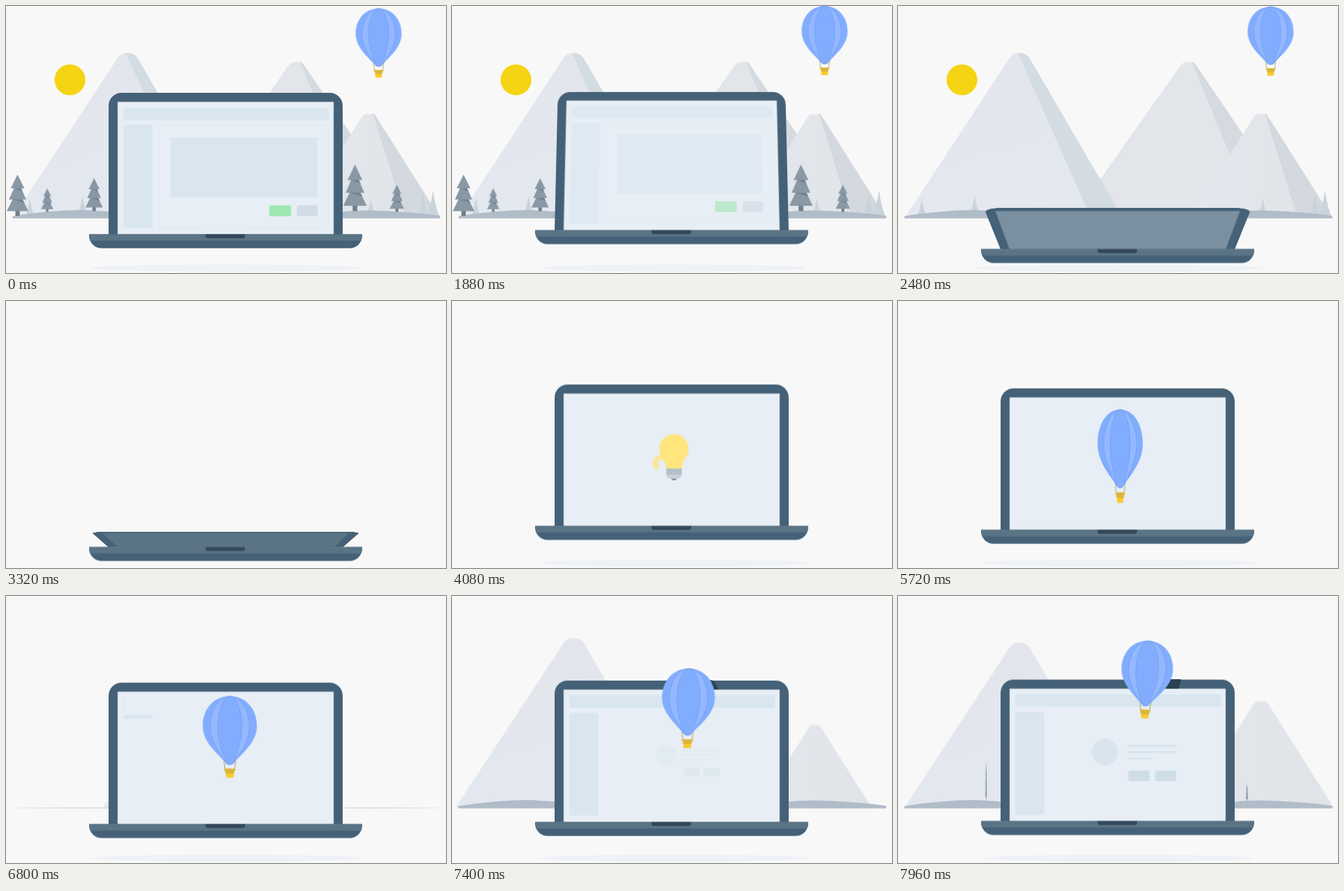
These frames come from a looping animation (609x369 px, 8000 ms). An HTML page without scripts:

```html
<!DOCTYPE html>
<html lang="en">
<head>
<meta charset="utf-8">
<title>Laptop and balloon</title>
<style>
html, body { margin: 0; width: 100%; height: 100%; overflow: hidden; background: #f8f8f8; }
.stage { position: relative; width: 609px; height: 369px; overflow: hidden; }
svg { position: absolute; left: 0; top: 0; display: block; overflow: visible; }
.anim, .stage [class] { animation-duration: 8s; animation-iteration-count: infinite; animation-timing-function: ease-in-out; }

/* scenery */
.sun { animation-name: sun; transform-origin: 88.5px 102px; }
.hill { animation-name: hill; }
.left { transform-origin: 160px 293px; }
.right { transform-origin: 502px 293px; animation-name: hill-late; }
.mid { transform-origin: 403px 293px; animation-name: hill-once; }
.face { animation-name: face; }
.ground { animation-name: ground; transform-origin: 0 293.5px; }
.pines { animation-name: pines; transform-origin: 0 290px; }
.tree { animation-name: tree; }
.shade { animation-name: shade; transform-origin: 306px 362px; }
@keyframes sun { 0%, 32% { transform: scale(1) } 37%, 100% { transform: scale(0) } }
@keyframes hill {
  0%, 32% { transform: scale(1) }
  38%, 84.2% { transform: scale(0); animation-timing-function: linear }
  85% { transform: scale(.17); animation-timing-function: ease-out }
  92.5% { transform: scale(1.03) }
  96.5% { transform: scale(.992) }
  100% { transform: scale(1.004) }
}
@keyframes hill-late {
  0%, 32% { transform: scale(1) }
  38%, 86% { transform: scale(0); animation-timing-function: ease-out }
  97% { transform: scale(1.03) }
  100% { transform: scale(1.026) }
}
@keyframes hill-once { 0%, 32% { transform: scale(1) } 37%, 100% { transform: scale(0) } }
@keyframes face { 0%, 38% { opacity: 1 } 38.1%, 100% { opacity: 0 } }
@keyframes ground {
  0%, 35% { transform: scaleY(1) }
  40%, 84.2% { transform: scaleY(0) }
  85% { transform: scaleY(.08) }
  91%, 100% { transform: scaleY(1) }
}
@keyframes pines { 0%, 32% { transform: scaleY(1) } 36%, 100% { transform: scaleY(0) } }
@keyframes tree {
  0%, 24.5% { transform: scale(1) }
  30.5%, 98.4% { transform: scale(0, .3) }
  99.4%, 100% { transform: var(--grown, scale(0, .3)) }
}
@keyframes shade {
  0% { transform: none; opacity: 1 }
  15%, 23.5% { transform: scaleX(.979); opacity: 1 }
  31% { transform: scaleX(1.05); opacity: 1 }
  36%, 43% { transform: scaleX(1.05); opacity: 0 }
  50.6% { transform: scaleX(.981); opacity: 1 }
  77% { transform: scaleX(1.004); opacity: 1 }
  100% { transform: scaleX(.981); opacity: 1 }
}

/* laptop */
.laptop { position: absolute; left: 0; top: 0; width: 609px; height: 369px; animation-name: hover; }
.hinge { position: absolute; left: 141.5px; top: 119.5px; width: 324px; height: 196px; perspective: 1450px; perspective-origin: 50% 2%; }
.lid { position: absolute; inset: 0; transform-origin: 50% 100%; animation-name: lid; }
.screen { animation-name: screen; }
.editor { animation-name: editor; }
.bar { animation-name: bar; transform-origin: 162px 140px; }
.side { animation-name: side; transform-origin: 162px 164px; }
.card { animation-name: card; transform-origin: 326px 230px; }
.cast { animation-name: cast; }
@keyframes hover {
  0% { transform: none; animation-timing-function: cubic-bezier(.3, .45, .6, 1) }
  15.6% { transform: translateY(-15.5px); animation-timing-function: cubic-bezier(.35, 0, .68, .15) }
  23.5% { transform: translateY(-5.7px); animation-timing-function: cubic-bezier(.35, .45, .65, .9) }
  31.5% { transform: translateY(21px); animation-timing-function: ease-out }
  36% { transform: translateY(25.3px) }
  41.5% { transform: translateY(24.5px); animation-timing-function: cubic-bezier(.4, .05, .4, 1) }
  50.6% { transform: translateY(-4.6px); animation-timing-function: cubic-bezier(.37, 0, .63, 1) }
  76.9% { transform: translateY(1.3px); animation-timing-function: cubic-bezier(.37, 0, .63, 1) }
  100% { transform: translateY(-4.5px) }
}
@keyframes lid {
  0%, 17% { transform: rotateX(0) }
  23.5% { transform: rotateX(12.35deg) }
  34%, 39% { transform: rotateX(-84deg) }
  41.5% { transform: rotateX(-77deg) }
  48% { transform: rotateX(3deg) }
  50.5%, 100% { transform: rotateX(0) }
}
@keyframes screen {
  0%, 27% { fill: #e7eef5 }
  33%, 42% { fill: #5a7385 }
  46%, 100% { fill: #e7eef5 }
}
@keyframes editor { 0%, 20% { opacity: 1 } 28%, 100% { opacity: 0 } }
@keyframes bar {
  0%, 20% { opacity: 1; transform: none }
  28% { opacity: 0; transform: none }
  28.1%, 84.7% { opacity: 0; transform: scaleX(0) }
  84.8% { opacity: 1; transform: scaleX(.003); animation-timing-function: ease-in-out }
  92%, 100% { opacity: 1; transform: none }
}
@keyframes side {
  0%, 20% { opacity: 1; transform: none }
  28% { opacity: 0; transform: none }
  28.1%, 84% { opacity: 0; transform: scaleY(0) }
  84.1% { opacity: 1; transform: scaleY(0) }
  85% { opacity: 1; transform: scaleY(.04) }
  92%, 100% { opacity: 1; transform: none }
}
@keyframes card {
  0%, 90% { opacity: 0; transform: scale(.6) }
  96%, 100% { opacity: 1; transform: none }
}
@keyframes cast {
  0%, 85% { opacity: 0; transform: translate(-37px, 90px) }
  85.1% { opacity: 1; transform: translate(-37px, 90px) }
  99.5%, 100% { opacity: 1; transform: none }
}

/* bulb that becomes the balloon */
.flyer { animation-name: fly; }
.skin { animation-name: skin; }
.gear { animation-name: gear; }
.cap { animation-name: cap; }
.tail { animation-name: tail; }
@keyframes fly {
  0% { transform: translate(515.7px, 3.5px) }
  26% { transform: translate(515.7px, 0) }
  32% { transform: translate(515.7px, 1px) }
  37% { transform: translate(515.7px, 45px) scale(0) }
  37.1%, 45.5% { transform: translate(307.3px, 216px) scale(0) }
  49% { transform: translate(307.3px, 182px) scale(1.06) }
  51% { transform: translate(307.3px, 184px) }
  61% { transform: translate(307.3px, 187px) }
  64% { transform: translate(307.3px, 194px) scale(1.05, .85) }
  71.5% { transform: translate(307.5px, 150px) scale(.985, 1.35) }
  76% { transform: translate(308px, 138px) scale(1.25, 1.12) }
  80% { transform: translate(309px, 140px) scale(1.16, 1.19) }
  85% { transform: translate(309.8px, 138.5px) scale(1.18); animation-timing-function: cubic-bezier(.4, .1, .65, .9) }
  99.5% { transform: translate(347px, 62px) rotate(3deg) scale(1.123) }
  100% { transform: translate(348px, 60px) rotate(3deg) scale(1.12) }
}
@keyframes skin {
  0%, 37% { fill: #82adff; d: path("M0,0C19,0 31.8,15 31.8,35C31.8,55 12,69 5,78Q0,83 -5,78C-12,69 -31.8,55 -31.8,35C-31.8,15 -19,0 0,0Z") }
  37.1%, 61% { fill: #ffe57c; d: path("M0,0C11,0 20.2,9 20.2,20.5C20.2,32 11.5,34 10.5,48Q0,48 -10.5,48C-11.5,34 -20.2,32 -20.2,20.5C-20.2,9 -11,0 0,0Z") }
  67%, 100% { fill: #82adff; d: path("M0,0C19,0 31.8,15 31.8,35C31.8,55 12,69 5,78Q0,83 -5,78C-12,69 -31.8,55 -31.8,35C-31.8,15 -19,0 0,0Z") }
}
@keyframes gear { 0%, 37% { opacity: 1 } 37.1%, 64% { opacity: 0 } 68%, 100% { opacity: 1 } }
@keyframes cap { 0%, 37% { opacity: 0 } 37.1%, 61% { opacity: 1 } 64%, 100% { opacity: 0 } }
@keyframes tail {
  0%, 48.5% { opacity: 0 }
  49.5%, 51.5% { opacity: 1 }
  53%, 100% { opacity: 0 }
}
</style>
</head>
<body>
<div class="stage">

<svg width="609" height="369" viewBox="0 0 609 369">
  <defs>
    <linearGradient id="rock" x1="0" y1="0" x2=".4" y2="1">
      <stop offset="0" stop-color="#e2e5eb"/>
      <stop offset="1" stop-color="#e4e8f0"/>
    </linearGradient>
    <linearGradient id="rock2" x1="0" y1="0" x2="1" y2="0">
      <stop offset="0" stop-color="#e4e8ee"/>
      <stop offset="1" stop-color="#e0e3e7"/>
    </linearGradient>
    <g id="fir">
      <path fill="#6f7f8d" d="M-3,-9h6v9h-6z"/>
      <path fill="#8998a5" d="M0,-57L9.5,-38H5L12,-22.500H7L15,-6.500H-15L-7,-22.500H-12L-5,-38H-9.500Z"/>
      <path fill="#71818f" d="M-5,-38H5L7,-34ZM-7,-22.500H7L9.500,-18Z"/>
    </g>
    <path id="pine" fill="#c9d4da" d="M0,-1Q.22,-.3 .5,0H-.5Q-.22,-.3 0,-1Z"/>
    <clipPath id="bezel"><path d="M141.500,119.500h324v12.500h-324z"/></clipPath>
  </defs>

  <circle class="sun" cx="88.5" cy="102" r="21.3" fill="#f5d414"/>

  <g class="hill mid">
    <path fill="#e2e5ea" d="M242,293L392,81Q396,77 403,77Q409,77 412,81L556,293Z"/>
    <path class="face" fill="#d4dae0" d="M407,77.300Q410,78 412,81L556,293H495Z"/>
  </g>
  <g class="hill left">
    <path fill="url(#rock)" d="M9,293L155,71Q160,64.500 166,65Q177,64 182,72L311,293Z"/>
    <path class="face" fill="#d3dce2" d="M166,65Q177,64 182,72L311,293H267Z"/>
  </g>
  <g class="hill right">
    <path fill="url(#rock2)" d="M403,293L494,151Q496,149 499,149.500Q503,150.500 506,149Q509,148.500 511,151L601,293Z"/>
    <path class="face" fill="#d3d9df" d="M508,149Q510,149 511,151L601,293H553Z"/>
  </g>

  <g class="pines">
    <use href="#pine" transform="translate(33 288) scale(11 22)"/>
    <use href="#pine" transform="translate(106 285) scale(12 23)"/>
    <use href="#pine" transform="translate(505 285) scale(10 19)"/>
    <use href="#pine" transform="translate(577 290) scale(15 32)"/>
    <use href="#pine" transform="translate(591 291) scale(18 36)"/>
  </g>
  <path class="ground" fill="#b0bcc8" d="M9,293.500v-3Q60,282 105,282Q140,283 200,290H420Q470,282.500 500,282.500Q560,284 601,290v3.500Z"/>

  <g transform="translate(16 290)"><use class="tree" href="#fir"/></g>
  <g transform="translate(57 284.5) scale(.57)"><use class="tree" href="#fir"/></g>
  <g transform="translate(122 283.5) scale(.8)"><use class="tree" href="#fir" style="--grown: scale(.1, 1.2)"/></g>
  <g transform="translate(483 283.5) scale(1.08 1.13)"><use class="tree" href="#fir" style="--grown: scale(.1, .37)"/></g>
  <g transform="translate(541 284.5) scale(.66)"><use class="tree" href="#fir"/></g>

  <ellipse class="shade" cx="306.3" cy="362.3" rx="188.5" ry="5" fill="#eef1f6"/>
</svg>

<div class="laptop">
  <div class="hinge"><div class="lid">
    <svg width="324" height="196" viewBox="141.5 119.5 324 196">
      <path fill="#456177" d="M141.500,315.500v-178a18,18 0 0 1 18,-18h288a18,18 0 0 1 18,18v178Z"/>
      <rect class="screen" x="154" y="132" width="299" height="183.5" fill="#e7eef5"/>
      <rect class="bar" x="162" y="140" width="284.500" height="17" fill="#d9e6ef"/>
      <rect class="side" x="162" y="164" width="40" height="142" rx="1" fill="#d9e6ef"/>
      <g class="editor">
        <rect x="211.500" y="164.500" width="234" height="141" rx="1" fill="none" stroke="#dde8f0"/>
        <rect x="227" y="181" width="203.500" height="83" fill="#d9e6ef"/>
        <rect x="364" y="275" width="30" height="15" rx="1" fill="#9ee7b0"/>
        <rect x="402" y="275" width="29" height="15" rx="1" fill="#d0dde7"/>
      </g>
      <g class="card" fill="#d8e5ed">
        <circle cx="286" cy="219.500" r="18.2"/>
        <path d="M317,209.500h67v3h-67zM317,218.300h67v3h-67zM317,227h35v2.500h-35z"/>
        <path fill="#cfdde7" d="M318.500,245.300h29v14.500h-29zM355.500,245.300h29v14.500h-29z"/>
      </g>
      <g clip-path="url(#bezel)">
        <ellipse class="cast" cx="355" cy="112" rx="36.500" ry="45" fill="#2b4052"/>
      </g>
    </svg>
  </div></div>
  <svg width="609" height="369" viewBox="0 0 609 369">
    <path fill="#456177" d="M115,315.500h378v2a17.300,17.300 0 0 1 -17.300,17.300H132.300a17.300,17.300 0 0 1 -17.300,-17.300Z"/>
    <path fill="#5a7385" d="M115,315.500h378q0,5 -1.500,9H116.500q-1.500,-4 -1.500,-9Z"/>
    <path fill="#33485a" d="M276,315.500h55v1.500a4,4 0 0 1 -4,4h-47a4,4 0 0 1 -4,-4Z"/>
  </svg>
</div>

<svg width="609" height="369" viewBox="0 0 609 369">
  <g class="flyer">
    <path class="tail" fill="none" stroke="#ffe57c" stroke-width="7" stroke-dasharray="1.600 .5" d="M-13,33.500Q-26,30 -26,40Q-26,45 -22,47"/>
    <g class="gear">
      <path fill="none" stroke="#b9a56a" d="M-7,74L-5.500,86M7,74L5.500,86"/>
      <path fill="#fbc92d" d="M-5.500,85h11l-1.300,10.500h-8.400Z"/>
      <path fill="#dcb436" d="M-6.500,85h13v2h-1l-.5,3.500h-10l-.5,-3.500h-1Z"/>
    </g>
    <path class="skin" fill="#82adff" d="M0,0C19,0 31.8,15 31.8,35C31.8,55 12,69 5,78Q0,83 -5,78C-12,69 -31.8,55 -31.8,35C-31.8,15 -19,0 0,0Z"/>
    <g class="gear" stroke="#749fee" stroke-width=".8">
      <path fill="#94b8ff" d="M0,0C-14,2 -23,17 -23,36C-23,54 -10,69 -4,78H4C10,69 23,54 23,36C23,17 14,2 0,0Z"/>
      <path fill="#82adff" d="M0,0C-8,1 -14,17 -14,36C-14,54 -7,71 -3,79.500H3C7,71 14,54 14,36C14,17 8,1 0,0Z"/>
    </g>
    <g class="cap">
      <path fill="#b3bfc9" d="M-10.700,47.500h21.400v8.500h-21.400Z"/>
      <path fill="#c7d1d8" d="M-10.700,56h21.400q-1,4 -6,6h-9.400q-5,-2 -6,-6Z"/>
      <path fill="#7f8c98" d="M-4,61.500h8q-1.500,2.500 -4,2.500t-4,-2.500Z"/>
    </g>
  </g>
</svg>

</div>
</body>
</html>
```
